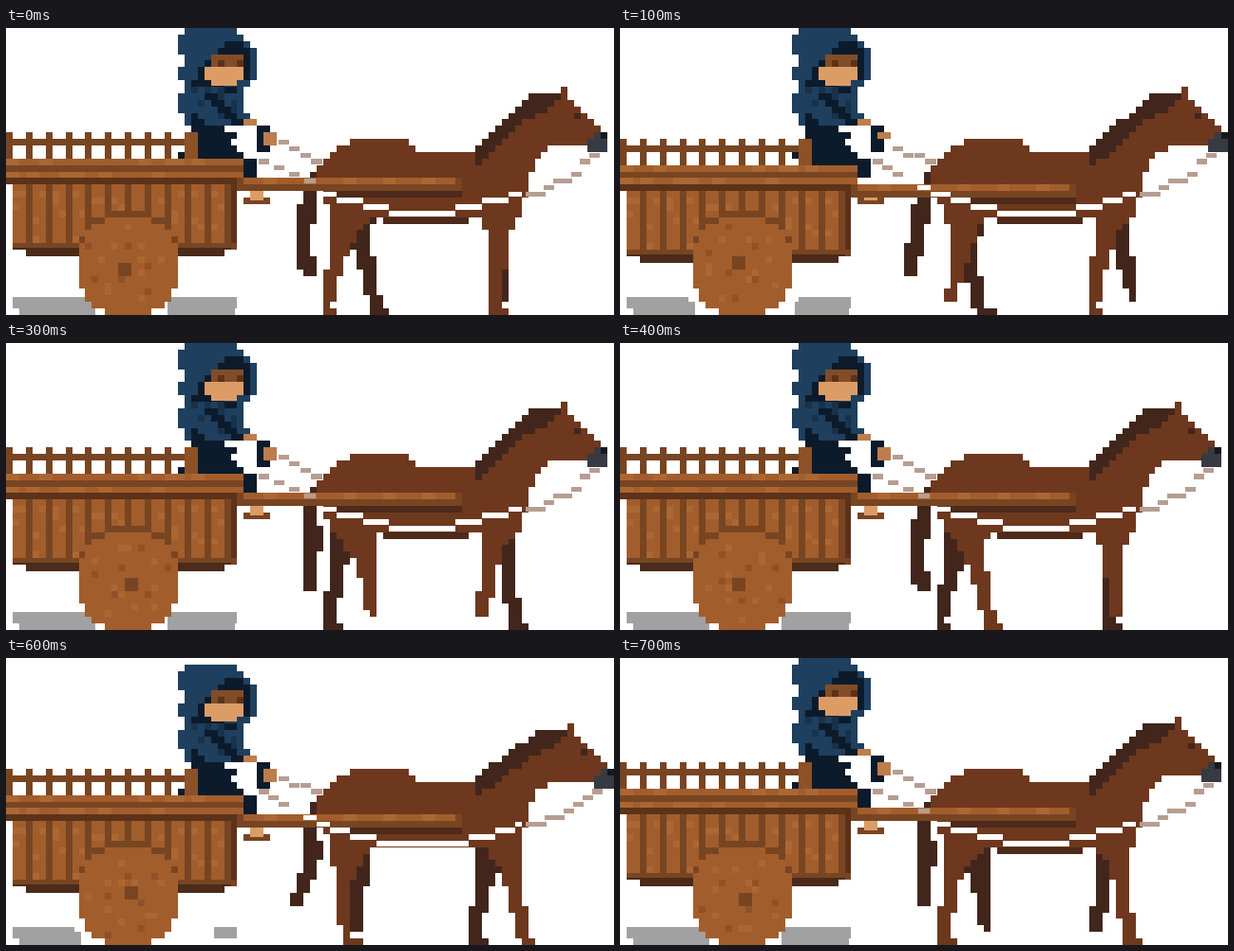
Recreate the animation shown at these times as an HTML page with a canvas. Size 640x303 px, loop 800 ms.

```html
<!DOCTYPE html>
<html lang="en">
<head>
<meta charset="utf-8">
<title>Horse and cart</title>
<style>
html, body { margin: 0; height: 100%; overflow: hidden; background: #fff; }
canvas { display: block; width: 100vw; height: 100vh; }
</style>
</head>
<body>
<canvas id="stage" width="640" height="303"></canvas>
<script>
const ctx = document.getElementById('stage').getContext('2d');
const UX = 640 / 92, UY = 303 / 44; // the art sits on a 92 by 44 grid
const STEP = 100, STEPS = 8;
const { PI, sin, cos, sqrt, floor, round, min, max } = Math;

const C = {
  navy: '#1f3f5e', fold: '#18324c', night: '#0c1b2b', skin: '#dc9c66', tan: '#bd7d4d', hair: '#834c28',
  wood: '#a25d2c', pale: '#ab6733', plank: '#784522', dark: '#5c3219', edge: '#4b2b1a',
  coat: '#6d381e', mane: '#42261c', shade: '#4d2a1a', muzzle: '#363a43', nose: '#17181d',
  rein: '#b69d92', ground: '#a1a1a1', white: '#fff'
};

let dy = 0;

function box(color, x0, y0, x1, y1) {
  const l = round(x0 * UX), t = round((y0 + dy) * UY);
  ctx.fillStyle = color;
  ctx.fillRect(l, t, round(x1 * UX) - l, round((y1 + dy) * UY) - t);
}

const points = text => text.split(',').map(p => p.split(' ').map(Number));

// Polygon snapped to grid cells
function poly(color, pts) {
  const ys = pts.map(p => p[1]);
  for (let y = floor(min(...ys)); y < max(...ys); y++) {
    const hits = [];
    pts.forEach(([x0, y0], i) => {
      const [x1, y1] = pts[(i + 1) % pts.length], mid = y + .5;
      if ((y0 > mid) !== (y1 > mid)) hits.push(x0 + (x1 - x0) * (mid - y0) / (y1 - y0));
    });
    hits.sort((a, b) => a - b);
    for (let i = 0; i + 1 < hits.length; i += 2) box(color, round(hits[i]), y, round(hits[i + 1]), y + 1);
  }
}

// Tapered limb through joints [x, y, width], top to bottom
function limb(color, joints) {
  for (let i = 1; i < joints.length; i++) {
    const [x0, y0, w0] = joints[i - 1], [x1, y1, w1] = joints[i];
    for (let y = round(y0); y < round(y1); y++) {
      const t = (y + .5 - y0) / (y1 - y0);
      const x = x0 + (x1 - x0) * t, w = w0 + (w1 - w0) * t;
      const l = round(x - w / 2);
      box(color, l, y, max(l + 1, round(x + w / 2)), y + 1);
    }
  }
}

// Dashes along a sagging line
function rein(x0, y0, x1, y1, sag, count) {
  for (let i = 0; i < count; i++) {
    const t = i / (count - 1);
    const x = x0 + (x1 - x0) * t, y = round(y0 + (y1 - y0) * t + sag * 4 * t * (1 - t));
    box(C.rein, x - .8, y + .1, x + .8, y + .85);
  }
}

function noise(n) {
  const v = sin(n * 127.1 + 3.7) * 43758.5453;
  return v - floor(v);
}

const wave = n => cos(n * 2 * PI / STEPS);

// The carriage sinks for two of every four steps and dips in the second
function pose(n) {
  const m = n % 4;
  return { n, late: +(m > 1), low: +(m === 1 || m === 2), dip: +(m === 2) };
}

function ground({ low, dip }) {
  const l = 13 - 2.2 * low, r = 24.5 + 2 * low + 4.5 * dip;
  dy = 0;
  box(C.ground, 1, 41.2, l - .5, 43);
  box(C.ground, 2, 42, l + .5, 44);
  box(C.ground, r + .5, 41.2, 35, 43);
  box(C.ground, r + 1.5 * dip, 42, 34.7, 44 - dip);
}

function rider({ low, dip }) {
  dy = dip;
  poly(C.navy, points('27 0,34 0,38 3,38 8,36 9,28 9,26 8,26 6,27 5,26 4,26 1'));
  poly(C.navy, points('27 9,36 9,36 14,28 16,26 12,26 10'));
  for (let i = 0; i < 14; i++) {
    const x = 28 + floor(noise(i) * 8), y = 9 + floor(noise(i + 40) * 5);
    box(C.fold, x, y, x + 1, y + 1);
  }
  poly(C.night, points('33 2,36 2,37 4,37 8,28 9,29 6'));
  box(C.hair, 31, 4, 36, 6);
  for (const x of [32, 35]) box(C.dark, x, 5, x + 1, 6);
  box(C.skin, 30, 6, 36, 8);
  box(C.skin, 31, 8, 35, 8.8);

  for (let i = 0; i < 5; i++) box(C.night, 30 + i, 10 + i, 32 + i, 11 + i);
  box(C.night, 33, 9, 35, 10);
  poly(C.night, points('28 12,30 15,35 16,34 18,36 20,36 21,29 21,28 16'));
  box(C.night, 26, 19, 27, 20);
  box(C.navy, 35, 13, 37, 14);
  box(C.tan, 36, 14, 38, 15);
  poly(C.night, points('37 15,40 15,40 18,39 19,38 19,38 16'));
  box(C.tan, 39, 16, 41, 18 - low + dip);

  box(C.night, 36, 20, 38, 23);
  box(C.plank, 36, 26, 40, 27);
  box(C.skin, 37, 25, 39, 26.4);
}

function leg(color, x, width, n, bend) {
  const lift = max(0, sin(n * 2 * PI / STEPS));
  const knee = x + 2.2 * wave(n - bend), hoof = x + 4 * wave(n - 3.8);
  limb(color, [
    [x, 28, width],
    [(x + knee) / 2, 31, width * .65],
    [knee, 34, 2.7],
    [hoof, 44 - 2.5 * lift, 1.5]
  ]);
  if (lift < .1) box(color, round(hoof), 43, round(hoof) + 2, 44);
}

function legs(color, n) {
  leg(color, 52.2, 7, n, 3.3);
  leg(color, 74.5, 6, n - 2, 4);
}

function horse({ n, low, dip }) {
  dy = 0;
  limb(C.mane, [
    [48, 21, 2],
    [46, 25, 2.5],
    [45.8 - cos((n - .5) * PI / 2), 31, 2.4],
    [44.7 + 1.3 * cos((n + .5) * PI / 2), 38, 2]
  ]);
  legs(C.mane, n + 4);
  poly(C.coat, points('47 22,49 19,53 17,60 17,62 19,80 19,79 24,78 28,77 29,50 29,48 26'));
  if (!dip) box(C.shade, 57, 29, 70, 30);
  legs(C.coat, n);

  // The head nods while the foot of the neck stays put
  const nod = text => points(text).map(([x, y]) => [x + low, y + dip]);
  poly(C.coat, [
    ...nod('80 10,84 10,84 9,85 9,85 10.5,90 15,90 17,88 18,82.5 18'),
    ...points('80 20,79 23,71 23,71 18')
  ]);
  poly(C.mane, [...nod('80 10,84 10,82 12.5,78 14.5'), ...points('73 20,71 21,71 18')]);
  dy = dip;
  box(C.mane, 86 + low, 13, 87 + low, 14);
  box(C.muzzle, 89 + low, 16, 91 + low, 19);
  box(C.muzzle, 88 + low, 17, 89 + low, 19);
  box(C.nose, 90 + low, 16, 91 + low, 17);
}

function cart({ low }) {
  dy = low;
  for (let x = 0; x < 27; x += 3) box(C.plank, x, 16, x + 1, 20);
  box(C.plank, 0, 17, 27, 18);
  box('#8d5127', 27, 16, 29, 20);

  box(C.plank, 1, 24, 35, 34);
  for (let x = 1; x < 34; x += 3) {
    box(C.wood, x, 24, x + 2, 33);
    for (let k = 0; k < 3; k++) {
      const y = 25 + floor(noise(x * 5 + k) * 8);
      box(C.pale, x + k % 2, y, x + k % 2 + 1, y + 1);
    }
  }
  box(C.dark, 34, 24, 35, 33);
  box(C.edge, 1, 33.7, 34, 34);
  box(C.edge, 3, 34, 33, 35);

  [C.wood, C.plank, C.wood, C.dark].forEach((c, i) => box(c, 0, 20 + i, 36, 21 + i));
  for (let k = 0; k < 12; k++) {
    const x = floor(noise(k + 80) * 34), y = 20 + k % 2 * 2;
    box(C.pale, x, y, x + 2, y + 1);
  }

  box(C.plank, 35, 23, 69, 25);
  box(C.wood, 36, 23, 68, 24);
  box(C.shade, 50, 25, 69, 26);
  for (let x = 39; x < 67; x += 6) box(C.pale, x, 23, x + 2, 24);
}

function disc(color, cy, last) {
  for (let d = -7; d <= last; d++) {
    const half = min(7.5, round(sqrt(64 - d * d) - .5) + .5);
    box(color, 18.5 - half, cy + d, 18.5 + half, cy + d + 1);
  }
}

function wheel({ n, low, late }) {
  dy = 0;
  disc(C.plank, 35, -3);
  disc(C.wood, 36, 7);
  for (let k = 0; k < 16; k++) {
    const a = k * 2.4 + n * PI / 4, r = 2.5 + noise(k) * 4;
    const x = round(18 + cos(a) * r), y = round(36 + sin(a) * r);
    box(k % 3 ? C.pale : '#8f5128', x, y, x + 1, y + 1);
  }
  box(C.plank, 17 + late, 36 - low, 19 + late, 38 - low);
}

function tack({ low, dip }) {
  dy = 0;
  for (let x = 48 - 3 * low; x < 78; x++) {
    const y = floor(28.3 + .25 * (low + dip) - 3.3 * ((x + .5 - 63) / 15) ** 2);
    box(C.white, x, y + .05, x + 1, y + .9);
  }
  rein(42, 17 + low, 47, 20, 0, 4);
  rein(39, 20, 46 - 4 * low, 23 - low, 0, 4 - low);
  rein(79.5, 25, 89 + .5 * low, 19 + .5 * dip, 1, 8);
}

const start = performance.now();
function loop() {
  const now = pose(floor((performance.now() - start) / STEP) % STEPS);
  ctx.fillStyle = C.white;
  ctx.fillRect(0, 0, 640, 303);
  for (const draw of [ground, rider, horse, cart, wheel, tack]) draw(now);
  requestAnimationFrame(loop);
}
loop();
</script>
</body>
</html>
```
